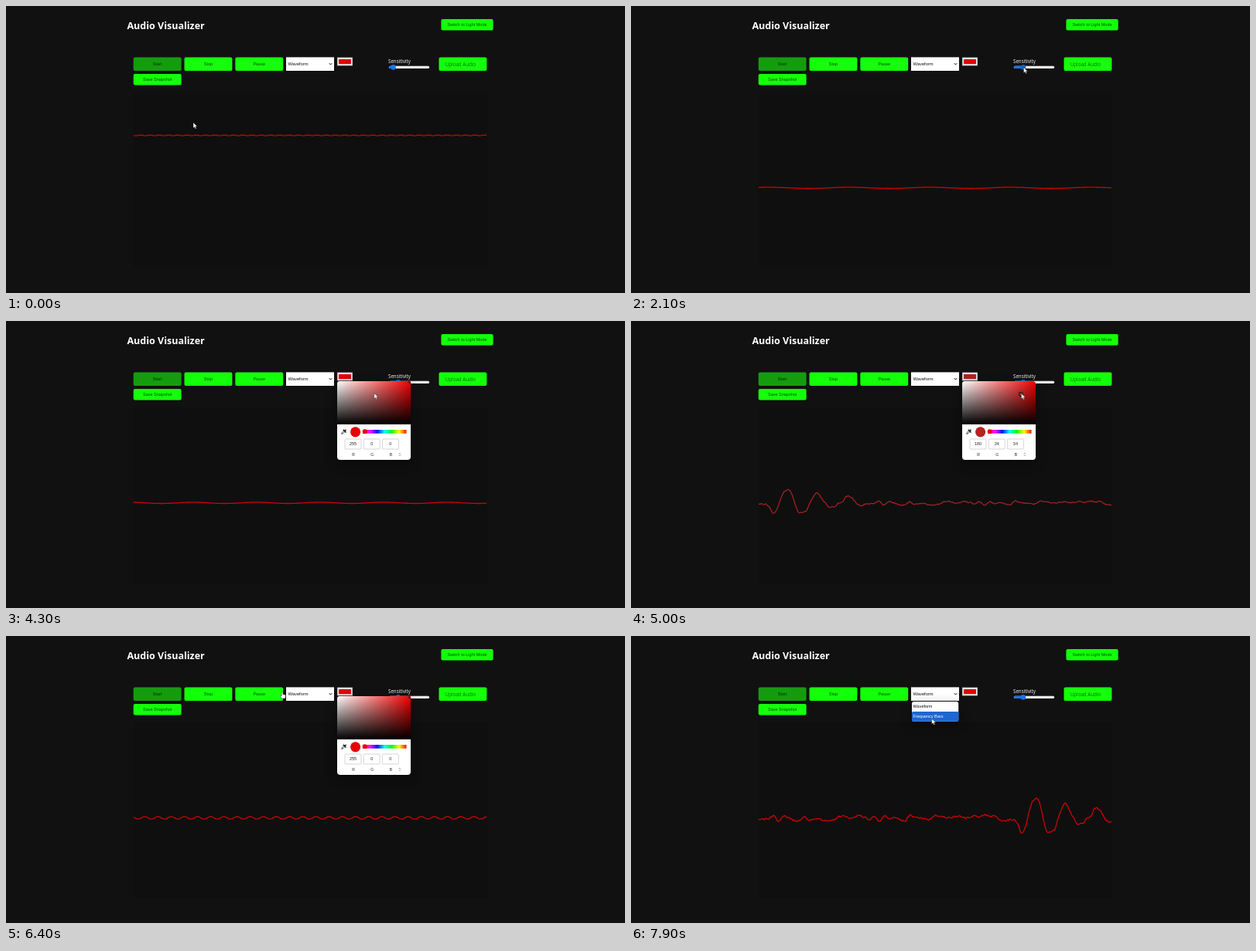
Write an HTML page that moves like this. It is 800 px wide and 372 px high and loops after 8 s.

```html
<!DOCTYPE html>
<html lang="en">
<head>
<meta charset="utf-8">
<title>Audio Visualizer</title>
<style>
  html, body { margin: 0; width: 100%; height: 100%; overflow: hidden; background: #111; }
  svg { display: block; width: 100vw; height: 100vh; }
  text { font: 5.5px "Liberation Sans", Arial, sans-serif; }
  .ui { font-family: "Open Sans", "Noto Sans", sans-serif; font-size: 6.2px; }
  .mid { text-anchor: middle; }
  .pop { filter: drop-shadow(0 4px 7px #0006); }
</style>
</head>
<body>
<svg viewBox="0 0 800 372">
  <defs>
    <linearGradient id="sat"><stop stop-color="#fff"/><stop offset="1" stop-color="#f00000"/></linearGradient>
    <linearGradient id="val" x2="0" y2="1"><stop stop-opacity="0"/><stop offset="1"/></linearGradient>
    <linearGradient id="hue"></linearGradient>
    <clipPath id="area"><rect x="428" y="78" width="95" height="56"/></clipPath>
    <clipPath id="panel"><rect x="428" y="78" width="95" height="102" rx="4"/></clipPath>
  </defs>
  <rect width="800" height="372" fill="#111"/>
  <rect x="165" y="112" width="457" height="228" fill="#0f0f0f"/>
  <text class="ui" x="156.5" y="30" style="font-size:12.5px;font-weight:700" fill="#fff">Audio Visualizer</text>
  <g id="buttons"></g>

  <rect x="362" y="66.4" width="62" height="17.6" fill="#fff"/>
  <text x="364.5" y="77.3" style="font-size:5.8px" fill="#111">Waveform</text>
  <path d="M417.8 74.2l1.7 1.9 1.7-1.9" fill="none" stroke="#111" stroke-width="1"/>
  <rect x="428.2" y="66.9" width="19.6" height="10.2" fill="#efefef" stroke="#aaa" stroke-width=".5"/>
  <rect id="swatch" x="430" y="69" width="16" height="6.2"/>

  <text class="ui" x="494" y="73.6" fill="#fff">Sensitivity</text>
  <rect x="494.8" y="77.7" width="52.4" height="3.4" rx="1.7" fill="#efefef"/>
  <rect id="fill" x="494.8" y="77.7" height="3.4" rx="1.7" fill="#1a73e8"/>
  <circle id="thumb" cy="79.4" r="3.3" fill="#1a73e8"/>

  <path id="wave" fill="none" stroke-width="1.3" stroke-opacity=".9" stroke-linejoin="round"/>

  <g id="picker" class="pop">
    <g clip-path="url(#panel)">
      <rect x="428" y="78" width="95" height="102" fill="#fff"/>
      <rect x="428" y="78" width="95" height="56" fill="url(#sat)"/>
      <rect x="428" y="78" width="95" height="56" fill="url(#val)"/>
    </g>
    <g clip-path="url(#area)"><circle id="marker" r="2.6" stroke="#222" stroke-width="1.1"/></g>
    <path d="M433.8 146.4l.5-1.7 2.8-2.8 1.2 1.2-2.8 2.8z" fill="none" stroke="#111" stroke-width=".8"/>
    <path d="M436.2 141.2l2.8 2.8M437.7 142.6l1.4-1.4" stroke="#111" stroke-width="1.5" stroke-linecap="round"/>
    <circle id="chosen" cx="451.6" cy="143.8" r="6.6"/>
    <rect x="461" y="141" width="56.5" height="4.8" fill="url(#hue)"/>
    <circle cx="463.7" cy="143.3" r="3" fill="#e60000"/>
    <g id="fields"></g>
    <path d="M507.9 172.2l1-1.1 1 1.1M507.9 173.6l1 1.1 1-1.1" fill="none" stroke="#333" stroke-width=".5"/>
  </g>

  <g id="menu" class="pop">
    <rect x="363" y="85" width="60.2" height="25.8" rx="2.5" fill="#fff"/>
    <rect id="hover" x="363" width="60.2" height="12.8" rx="1.5" fill="#1f67d0"/>
    <text id="opt0" x="364.6" y="93.3">Waveform</text>
    <text id="opt1" x="364.6" y="106.3">Frequency Bars</text>
  </g>

  <path id="arrow" d="M0 0V7.2L1.7 5.7 2.8 8.2 4 7.7 2.9 5.3H5.1Z" fill="#fff" stroke="#111" stroke-width=".4"/>
  <path id="hand" d="M-.8.2Q0-.6.8.2V3l3 .8Q4.6 4 4.4 5L3.8 8.5H-.2L-2.6 5.4Q-2.6 4.2-1.6 4.6L-.8 5.4Z" fill="#fff" stroke="#111" stroke-width=".4"/>
</svg>
<script>
const $ = id => document.getElementById(id);
const set = (id, attrs) => { for (const k in attrs) $(id).setAttribute(k, attrs[k]); };
const show = (id, on) => set(id, { visibility: on ? 'visible' : 'hidden' });
const clamp = v => Math.min(1, Math.max(0, v));
const lerp = (a, b, k) => a + (b - a) * k;
const smooth = k => k * k * (3 - 2 * k);
const ramp = (a, b, v) => clamp((v - a) / (b - a));

const LOOP = 8000, STEP = 100;
const LEFT = 165, WIDTH = 456, TAU = 2 * Math.PI;

// Toolbar controls sit on a regular grid
const column = i => 164.7 + 65.8 * i;
function button(label, x, y, { w = 61.9, h = 17.6, fill = '#14ff0a', ink = '#064a04' } = {}) {
  return `<rect x="${x}" y="${y}" width="${w}" height="${h}" rx="2" fill="${fill}"/>
    <text class="mid" x="${x + w / 2}" y="${y + h / 2 + 2}" fill="${ink}">${label}</text>`;
}
$('buttons').innerHTML =
  button('Switch to Light Mode', 562.4, 17, { w: 67.2, h: 14.6 }) +
  button('Start', column(0), 66.4, { fill: '#149c0e', ink: '#062a05' }) +
  button('Stop', column(1), 66.4) +
  button('Pause', column(2), 66.4) +
  button('', column(6), 66.4) +
  '<text class="ui" x="567.8" y="77.6" fill="#087006">Upload Audio</text>' +
  button('Save Snapshot', column(0), 88, { h: 14.4 });

$('fields').innerHTML = [...'RGB'].map((name, i) => {
  const x = 438 + i * 24.2;
  return `<rect x="${x}" y="153" width="21" height="13" rx="1" fill="#fff" stroke="#bbb" stroke-width=".6"/>
    <text id="${name}" class="mid" x="${x + 10.5}" y="161.4" fill="#222"></text>
    <text class="mid" x="${x + 11}" y="174.8" style="font-size:5px" fill="#222">${name}</text>`;
}).join('');
$('hue').innerHTML = Array.from({ length: 7 }, (_, i) =>
  `<stop offset="${i / 6}" stop-color="hsl(${360 - i * 60} 95% 52%)"/>`).join('');

const rand = n => { const v = Math.sin(n * 127.1 + 11.7) * 43758.5453; return v - Math.floor(v); };
// Smooth seeded noise from -1 to 1
function noise(v) {
  const i = Math.floor(v);
  return 2 * lerp(rand(i), rand(i + 1), smooth(v - i)) - 1;
}

// Pointer stops: time, x, y
const stops = [
  [300, 242, 151], [1200, 500, 79], [1900, 507.5, 79.5], [2200, 507.5, 79.5], [3400, 444.5, 83.5],
  [3700, 438, 73], [4300, 475.8, 93.5], [4800, 504, 94], [5700, 507.7, 92.8], [6000, 524, 77],
  [6400, 357, 72.5], [7000, 394, 76], [7900, 388.7, 107]
];
function pointerAt(t) {
  let [x, y] = stops[0].slice(1);
  for (let i = 1; i < stops.length; i++) {
    const k = smooth(ramp(stops[i - 1][0], stops[i][0], t));
    x = lerp(x, stops[i][1], k);
    y = lerp(y, stops[i][2], k);
  }
  return [x, y];
}

// Short words at a steady beat, a pause, then a longer swell
function loudness(t) {
  if (t > 5500) return ramp(7300, 7900, t);
  const beat = (t + 900) % 1200 - 600;
  return clamp(1 - Math.abs(Math.abs(beat) - 600) / 300);
}

// A spoken sound: fine ripple followed by a strong swing that fades out
function voice(x) {
  const from = x - 358;
  const swing = -26 * Math.cos(TAU * from / 39) * Math.exp(-Math.abs(from) / 70) * ramp(-27, -19, from);
  return swing + 4.5 * noise(x / 6.5) + 1.2 * noise(x / 1.7);
}

function wavePath(t, gain) {
  const loud = loudness(t);
  const shift = Math.floor(ramp(7900, 7300, t) * rand(t / STEP) * WIDTH);
  const length = 70 - 58 * Math.cos(TAU * t / 6000);
  const height = lerp(.8, 1.6, ramp(5900, 6300, t));
  let d = '';
  for (let i = 0; i <= WIDTH; i++) {
    const hum = height * Math.sin(TAU * (i + t * .13) / length);
    const dy = hum * (1 - loud) + loud * voice((i + shift) % (WIDTH + 1));
    d += `${i ? 'L' : 'M'}${LEFT + i} ${(99.7 + gain * (136 + dy)).toFixed(2)}`;
  }
  return d;
}

function draw(now) {
  const t = Math.floor(now % LOOP / STEP) * STEP;
  const [x, y] = pointerAt(t);

  const gain = Math.round(lerp(.5, 1, ramp(1400, 1900, t)) * 10) / 10;
  const knob = 494 + gain * 13;
  set('thumb', { cx: knob, fill: t >= 1200 && t <= 2200 ? '#1560c4' : '#1a73e8' });
  set('fill', { width: knob - 494.8 });

  const dark = t >= 4800 && t < 6000;
  const rgb = dark ? [180, 34, 34] : [255, 0, 0];
  const color = dark ? '#b42222' : '#e60000';
  ['swatch', 'chosen', 'marker'].forEach(id => set(id, { fill: color }));
  set('marker', dark ? { cx: 504, cy: 95 } : { cx: 523, cy: 78 });
  [...'RGB'].forEach((id, i) => $(id).textContent = rgb[i]);
  set('wave', { d: wavePath(t, gain), stroke: color });

  show('picker', t >= 3900 && t < 6700);
  show('menu', t >= 7000);
  const second = y > 97.5;
  set('hover', { y: second ? 98 : 85 });
  set('opt0', { fill: second ? '#111' : '#fff' });
  set('opt1', { fill: second ? '#fff' : '#111' });

  const overButton = x < 358 && y > 66 && y < 84;
  show('hand', overButton);
  show('arrow', !overButton);
  set(overButton ? 'hand' : 'arrow', { transform: `translate(${x} ${y})` });
}

const start = performance.now();
function tick() {
  draw(performance.now() - start);
  requestAnimationFrame(tick);
}
tick();
</script>
</body>
</html>
```
